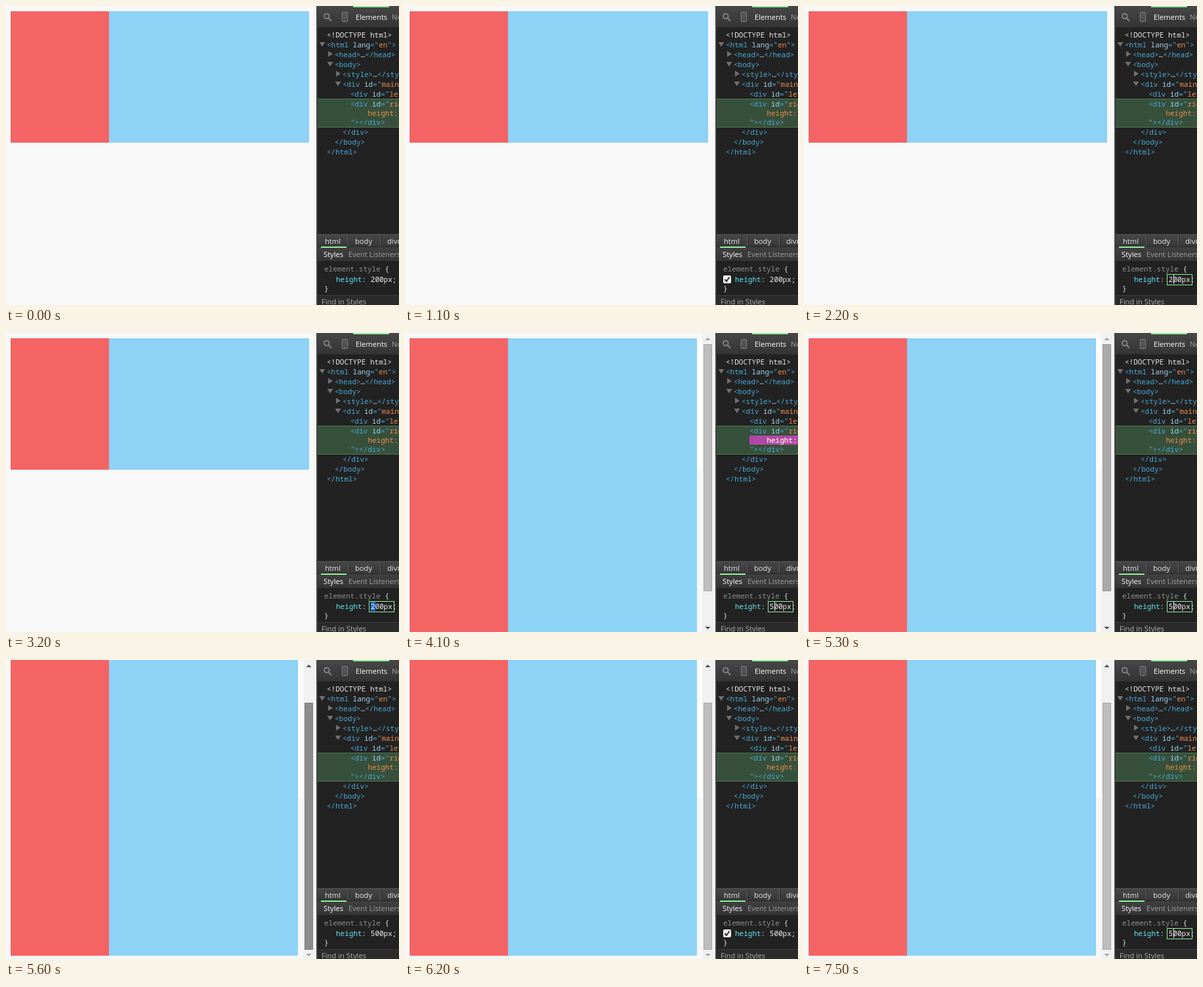
Write an HTML page with a canvas that moves like this. It is 599 px wide and 455 px high and loops after 8 s.

```html
<!DOCTYPE html>
<html lang="en">
<head>
<meta charset="utf-8">
<title>Element height inspector</title>
<style>
html, body { margin: 0; width: 100%; height: 100%; overflow: hidden; background: #f8f8f8; }
canvas { display: block; }
</style>
</head>
<body>
<canvas id="stage" width="599" height="455"></canvas>
<script>
const ctx = document.getElementById('stage').getContext('2d');
const LOOP = 8000;
const MONO = '11px "Noto Sans Mono", "DejaVu Sans Mono", monospace';
const UI = '11.2px "Open Sans", "Noto Sans", sans-serif';
const CELL = 6.6;
const TAG = '#4ba9d6', ATTR = '#a3d3ee', VALUE = '#ec8c4f', PLAIN = '#e6e6e6';
const PANEL = '#222222', GREEN = '#8df09a';

function box(x, y, w, h, color) {
  ctx.fillStyle = color;
  ctx.fillRect(x, y, w, h);
}

function shade(x, y, w, h, top, bottom) {
  const g = ctx.createLinearGradient(0, y, 0, y + h);
  g.addColorStop(0, top);
  g.addColorStop(1, bottom);
  box(x, y, w, h, g);
}

function frame(x, y, w, h, color) {
  ctx.strokeStyle = color;
  ctx.lineWidth = 1;
  ctx.strokeRect(x + 0.5, y + 0.5, w - 1, h - 1);
}

function text(str, x, y, color, font) {
  ctx.font = font;
  ctx.fillStyle = color;
  ctx.fillText(str, x, y);
}

// parts: alternating string and colour
function code(x, y, ...parts) {
  for (let i = 0; i < parts.length; i += 2) {
    text(parts[i], x, y, parts[i + 1], MONO);
    x += parts[i].length * CELL;
  }
}

function poly(color, ...p) {
  ctx.fillStyle = color;
  ctx.beginPath();
  for (let i = 0; i < p.length; i += 2) ctx.lineTo(p[i], p[i + 1]);
  ctx.fill();
}

const openMark = (x, y) => poly('#707070', x - 4.5, y - 3, x + 4.5, y - 3, x, y + 4);
const closedMark = (x, y) => poly('#707070', x - 3, y - 4.5, x + 4, y, x - 3, y + 4.5);

function drawPage(t) {
  const tall = t >= 4100;
  const scroll = t < 5500 ? 0 : t < 5600 ? 29 : 58;
  const top = 8 - scroll;
  const height = tall ? 500 : 200;
  const right = tall ? 445 : 462;
  box(0, 0, 474, 455, '#f8f8f8');
  if (tall) box(445, scroll ? 0 : 8, 8, scroll ? 208 : 200, '#fefefe');
  box(7, top, 150, height, '#f46464');
  box(157, top, right - 157, height, '#8ed2f6');
  if (tall) drawScrollbar(t, scroll);
}

function drawScrollbar(t, scroll) {
  let fill = '#bdbdbd', edge = '#a8a8a8';
  if (t >= 5500 && t < 6100) { fill = '#8d8d8d'; edge = '#7b7b7b'; }
  else if (t >= 5200 && t < 6200) { fill = '#a9a9a9'; edge = '#989898'; }
  box(453, 0, 17, 455, '#f1f1f1');
  const y = 17 + Math.round(scroll * 48 / 58);
  box(455, y, 13, 376, fill);
  frame(455, y, 13, 376, edge);
  const dark = '#505050', pale = '#a3a3a3';
  poly(scroll ? dark : pale, 457.5, 11, 465.5, 11, 461.5, 7);
  poly(scroll > 50 ? pale : dark, 457.5, 447, 465.5, 447, 461.5, 451);
}

function drawToolbar() {
  shade(475, 0, 124, 33, '#474747', '#343434');
  box(475, 32, 124, 1, '#2b2b2b');
  box(529, 0, 55, 2, GREEN);
  ctx.strokeStyle = '#808080';
  ctx.lineWidth = 2;
  ctx.beginPath();
  ctx.arc(488.8, 15.5, 3.8, 0, 7);
  ctx.moveTo(491.8, 18.5);
  ctx.lineTo(496, 23);
  ctx.stroke();
  ctx.lineWidth = 1.3;
  ctx.beginPath();
  ctx.roundRect(512.5, 10, 8, 13.5, 1.5);
  ctx.stroke();
  box(514, 12, 5, 8, '#555555');
  box(515.5, 21, 2, 1, '#808080');
  text('Elements', 533, 21, '#ffffff', UI);
  text('Network', 588, 21, '#a0a0a0', UI);
}

function drawTree(t) {
  box(475, 141, 124, 44, '#37503b');
  box(475, 141, 124, 1, '#4d7752');
  box(475, 184, 124, 1, '#4d7752');

  let glow = 0;
  if (t >= 4100 && t < 5300) {
    let step = Math.floor((t - 4100) / 100);
    if (step === 7) step = 6;
    glow = Math.pow(1 - step / 12, 1.3);
    box(525, 156, 74, 14, `rgba(176,72,168,${glow})`);
  }

  code(489, 48, '<!DOCTYPE html>', PLAIN);
  openMark(482, 58);
  code(489, 63, '<html ', TAG, 'lang', ATTR, '="', TAG, 'en', VALUE, '">', TAG);
  closedMark(494, 73);
  code(501, 78, '<head>', TAG, '…', PLAIN, '</head>', TAG);
  openMark(494, 88);
  code(501, 93, '<body>', TAG);
  closedMark(506, 103);
  code(513, 108, '<style>', TAG, '…', PLAIN, '</style>', TAG);
  openMark(506, 118);
  const div = (x, y, id) => code(x, y, '<div ', TAG, 'id', ATTR, '="', TAG, id, VALUE);
  div(513, 123, 'main');
  div(525, 138, 'left');
  div(525, 153, 'right');
  code(551.4, 167, 'height:', VALUE);
  if (glow) code(551.4, 167, 'height:', `rgba(255,255,255,${glow})`);
  code(525, 181, '"></div>', TAG);
  code(513, 196, '</div>', TAG);
  code(501, 211, '</body>', TAG);
  code(489, 226, '</html>', TAG);
}

function drawTabs() {
  shade(475, 347, 124, 20, '#484848', '#363636');
  box(475, 347, 124, 1, '#505050');
  for (const x of [521, 570]) {
    box(x, 348, 1, 19, '#626262');
    box(x + 1, 348, 1, 19, '#2c2c2c');
  }
  text('html', 486, 362, '#e8e8e8', UI);
  text('body', 532, 362, '#e8e8e8', UI);
  text('div#main', 581, 362, '#e8e8e8', UI);
  shade(475, 367, 124, 21, '#404040', '#343434');
  box(475, 366, 124, 1, '#292929');
  box(480, 366, 39, 2, GREEN);
  text('Styles', 484, 382, '#ffffff', UI);
  text('Event Listeners', 522, 382, '#a0a0a0', UI);
}

function drawCheck() {
  ctx.fillStyle = '#f2f2f2';
  ctx.beginPath();
  ctx.roundRect(485, 410, 12, 12, 2);
  ctx.fill();
  ctx.strokeStyle = '#333333';
  ctx.lineWidth = 2;
  ctx.beginPath();
  ctx.moveTo(487.5, 416);
  ctx.lineTo(490, 419);
  ctx.lineTo(494.5, 412.5);
  ctx.stroke();
}

function drawEditor(t) {
  if (t < 2200 || (t >= 7200 && t < 7500)) box(556, 409, 33, 14, '#1c6fd2');
  else if (t >= 3200 && t < 4100) box(556, 409, 7, 14, '#1c6fd2');
  frame(553, 408, 39, 17, GREEN);
}

function drawStyles(t) {
  const editing = (t >= 1600 && t < 5500) || t >= 7200;
  const adding = t >= 6800 && t < 7100;
  code(485, 404, 'element.style ', '#8f8f8f', '{', PLAIN);
  if ((t >= 1100 && t < 1600) || (t >= 6200 && t < 7200)) drawCheck();
  if (editing) drawEditor(t);
  code(503, 420, 'height', '#62e6f2', ': ', PLAIN, t < 4100 ? '200px' : '500px', '#f0f0f0');
  if (editing) {
    ctx.save();
    ctx.beginPath();
    ctx.rect(592, 408, 7, 18);
    ctx.clip();
  }
  code(555.8 + 5 * CELL, 420, ';', PLAIN);
  if (editing) ctx.restore();

  const caret = (t >= 2200 && t < 2700) || (t >= 4100 && t < 4600) ||
    (t >= 5100 && t < 5500) || t >= 7500;
  if (caret) box(563, 409, 1, 14, '#f0f0f0');

  if (adding) {
    frame(501, 423, 7, 16, GREEN);
    box(504, 425, 1, 12, '#f0f0f0');
    code(508, 434, ':', PLAIN);
    code(515, 434, ';', PLAIN);
  } else {
    code(485, 434, '}', PLAIN);
  }
  box(475, 440, 124, 15, '#2b2b2b');
  box(475, 440, 124, 1, '#3c3c3c');
  text('Find in Styles', 481, 454, '#b0b0b0', UI);
}

function draw(t) {
  drawPage(t);
  box(475, 0, 124, 455, PANEL);
  box(473, 0, 2, 455, '#444444');
  drawToolbar();
  drawTree(t);
  drawTabs();
  drawStyles(t);
}

const start = performance.now();
function tick(now) {
  draw(Math.max(0, now - start) % LOOP);
  requestAnimationFrame(tick);
}
draw(0);
requestAnimationFrame(tick);
</script>
</body>
</html>
```
